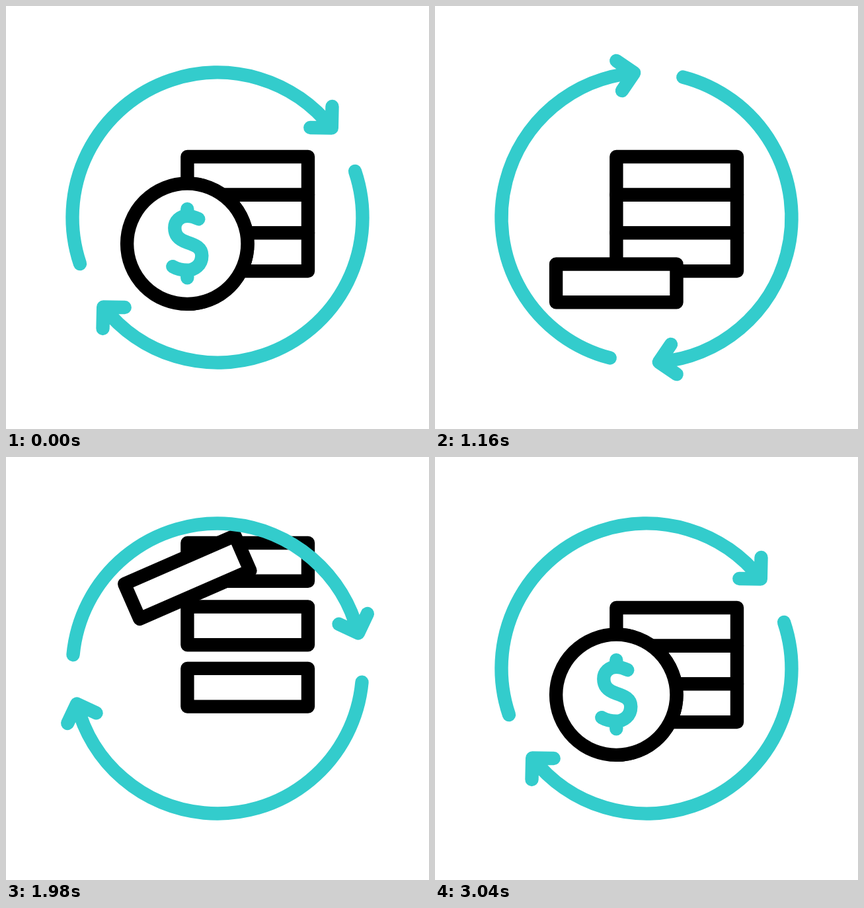
These frames come from a looping animation (640 by 640 pixels, 3.3 s). An HTML page with a canvas:

```html
<!DOCTYPE html>
<html lang="en">
<head>
<meta charset="utf-8">
<title>Coin cycle</title>
<style>
  html, body { margin: 0; width: 100%; height: 100%; overflow: hidden; background: #fff; }
  canvas { display: block; width: 100vmin; height: 100vmin; }
</style>
</head>
<body>
<canvas id="stage" width="640" height="640"></canvas>
<script>
const ctx = document.getElementById('stage').getContext('2d');
const TEAL = '#33cccc', BLACK = '#000', LINE = 20.4;
const LOOP = 3300, HALF = 1520;
const RAD = Math.PI / 180;
const RING = 219.5, COIN = 91.2, THICK = 57.7, COIN_X = 274.3;

// Keys are [ms, value], eased in and out between neighbours.
const ringTurn = [[0, 0], [520, -35], [2060, 387.3], [3000, 360]];
const coinY = [[0, 359.7], [460, 202.5], [1125, 419.4], [HALF, 419.4], [1980, 182], [2645, 359.7]];
const coinTilt = [[0, -90], [460, -22.6], [1125, 0], [HALF, 0], [1980, -23.6], [2080, -23.6], [2640, -90]];
const coinOpen = [[0, 1], [600, 0], [2080, 0], [2640, 1]];
const rows = [
  { y: 228, jump: [[0, 0], [285, -123], [889, 0]] },
  { y: 285.7, jump: [[0, 0], [285, -89.4], [733, 0]] },
  { y: 343.4, jump: [[0, 0], [285, -56.4], [600, 0]] }
];

function track(keys, t) {
  const i = keys.findIndex(k => k[0] > t);
  if (i < 0) return keys[keys.length - 1][1];
  const [t0, v0] = keys[i - 1], [t1, v1] = keys[i];
  const x = (t - t0) / (t1 - t0);
  return v0 + (v1 - v0) * x * x * (3 - 2 * x);
}

function paint(color, fill) {
  if (fill) {
    ctx.fillStyle = '#fff';
    ctx.fill();
  }
  ctx.strokeStyle = color;
  ctx.stroke();
}

function drawRows(t) {
  const local = t < HALF ? t : t - HALF;
  for (const row of rows) {
    ctx.beginPath();
    ctx.rect(274.4, row.y + track(row.jump, local), 182.6, THICK);
    paint(BLACK, true);
  }
}

function dollarPath() {
  ctx.beginPath();
  ctx.moveTo(17, -37.5);
  ctx.bezierCurveTo(11, -40.5, 6, -42, 0, -42);
  ctx.bezierCurveTo(-11, -42, -19, -34, -19, -24);
  ctx.bezierCurveTo(-19, -10, -9, -5, 0, -2);
  ctx.bezierCurveTo(12, 2, 22, 6, 22, 18);
  ctx.bezierCurveTo(22, 32, 11, 40, 0, 40);
  ctx.bezierCurveTo(-10, 40, -16, 38, -22, 34.5);
  ctx.moveTo(0, -52.5);
  ctx.lineTo(0, -42);
  ctx.moveTo(0, 40);
  ctx.lineTo(0, 51.5);
}

function drawCoin(t) {
  const open = track(coinOpen, t);
  const h = THICK * (1 - Math.pow(open, 1.4)) / 2;
  const minor = COIN * open;
  ctx.save();
  ctx.translate(COIN_X, track(coinY, t));
  ctx.rotate(track(coinTilt, t) * RAD);

  // Edge of the coin
  ctx.beginPath();
  ctx.moveTo(-COIN, -h);
  ctx.lineTo(-COIN, h);
  ctx.ellipse(0, h, COIN, minor, 0, Math.PI, 0, true);
  ctx.lineTo(COIN, -h);
  ctx.closePath();
  paint(BLACK, true);

  if (open > 0) {
    const face = new Path2D();
    face.ellipse(0, -h, COIN, minor, 0, 0, 2 * Math.PI);
    ctx.fillStyle = '#fff';
    ctx.fill(face);
    // Squash the sign's path but keep its line weight.
    ctx.save();
    ctx.translate(0, -h);
    ctx.scale(1, open);
    ctx.rotate(Math.PI / 2);
    dollarPath();
    ctx.restore();
    paint(TEAL);
    ctx.strokeStyle = BLACK;
    ctx.stroke(face);
  }
  ctx.restore();
}

function drawRing(t) {
  ctx.save();
  ctx.translate(320, 320);
  ctx.rotate(track(ringTurn, t) * RAD);
  for (let i = 0; i < 2; i++) {
    ctx.beginPath();
    ctx.arc(0, 0, RING, 161.4 * RAD, 321.85 * RAD);
    ctx.moveTo(173.5, -168);
    ctx.lineTo(172.8, -135.5);
    ctx.lineTo(140.3, -136);
    paint(TEAL);
    ctx.rotate(Math.PI);
  }
  ctx.restore();
}

function draw(now) {
  const t = now % LOOP;
  ctx.fillStyle = '#fff';
  ctx.fillRect(0, 0, 640, 640);
  ctx.lineWidth = LINE;
  ctx.lineCap = ctx.lineJoin = 'round';
  drawRows(t);
  drawCoin(t);
  drawRing(t);
}

let start;
function tick(now) {
  start ??= now;
  draw(now - start);
  requestAnimationFrame(tick);
}
draw(0);
requestAnimationFrame(tick);
</script>
</body>
</html>
```
